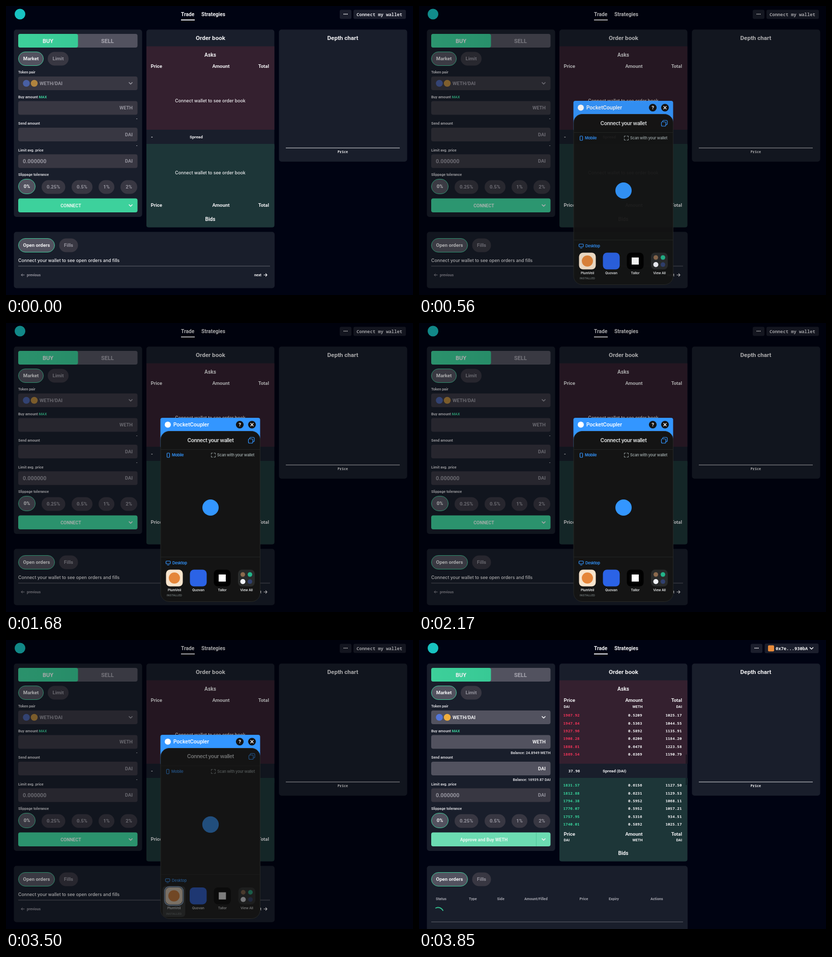
Write an HTML page that moves like this. It is 800 px wide and 570 px high and loops after 3920 ms.

```html
<!DOCTYPE html>
<html lang="en">
<head>
<meta charset="utf-8">
<title>Trade</title>
<style>
html, body { margin: 0; width: 100%; height: 100%; overflow: hidden; background: #000312; }
svg { display: block; width: 800px; height: 570px; }
text { font-family: Roboto, sans-serif; font-weight: 700; white-space: pre; }
.inter { font-family: Inter, sans-serif; font-weight: 500; }
.semi { font-family: Inter, sans-serif; font-weight: 600; }
.mono { font-family: "Noto Sans Mono", monospace; font-weight: 600; }
</style>
</head>
<body>
<svg id="stage" viewBox="0 0 800 570"></svg>
<script>
const LOOP = 3920, STEP = 70;
const WHITE = '#f1f1f3', GREY = '#96959f', GREEN = '#3dd19c', BLUE = '#3396ff';
const PANEL = '#191e2b', DIM = '#383742', LIT = '#52525f';

// Shape helpers; text y is the middle of the capitals.
const rect = (x, y, w, h, fill, r = 0, extra = '') =>
  `<rect x="${x}" y="${y}" width="${w}" height="${h}" rx="${r}" fill="${fill}" ${extra}/>`;
const dot = (x, y, r, fill) => `<circle cx="${x}" cy="${y}" r="${r}" fill="${fill}"/>`;
const path = (d, stroke, width = 1) =>
  `<path d="${d}" fill="none" stroke="${stroke}" stroke-width="${width}" stroke-linecap="round" stroke-linejoin="round"/>`;
const group = (id, body) => `<g id="${id}">${body}</g>`;
const text = (x, y, str, size, fill = WHITE, anchor = 'start', cls = '', gap = 0) =>
  `<text x="${x}" y="${y + size * .35}" font-size="${size}" fill="${fill}" text-anchor="${anchor}" class="${cls}" letter-spacing="${gap}">${str}</text>`;
const mid = (x, y, str, size, fill, cls, gap) => text(x, y, str, size, fill, 'middle', cls, gap);
const end = (x, y, str, size, fill, cls) => text(x, y, str, size, fill, 'end', cls);
const chevron = (x, y, color) => path(`M${x - 3} ${y - 1.5}l3 3 3-3`, color, 1.7);

function pill(x, y, w, h, label, active) {
  return rect(x, y, w, h, active ? LIT : DIM, h / 2, active ? 'stroke="#42c99a"' : '') +
    mid(x + w / 2, y + h / 2, label, 9.6, active ? WHITE : GREY);
}

function field(y, bright, label, token, value = '') {
  const color = bright ? WHITE : GREY;
  return text(24, y - 22, label, 7.2, '#d3d3d8') +
    rect(24, y - 13.5, 234.5, 27, bright ? bright > 1 ? LIT : '#464651' : DIM, 4) +
    text(33, y, value, 10.8, GREY) + end(249, y, token, 9.4, color);
}

function header(state) {
  const x = state ? 652 : 656;
  return dot(27.5, 16, 10.5, '#18c3c2') +
    text(344, 16, 'Trade', 10.2) + text(384, 16, 'Strategies', 10.2) + rect(344, 26.5, 27, 2, WHITE) +
    rect(x, 7.5, 23, 18, '#1b1e2c', 3) + [-3, 0, 3].map(d => dot(x + 11.5 + d, 16, 1.1, WHITE)).join('') +
    (state
      ? rect(679.5, 7, 106, 19, '#1b1e2c', 3) + rect(686, 10.5, 12, 12, '#e88a3a', 2) +
        text(701, 16.5, '0x7e...930bA', 8.8, WHITE, 'start', 'mono') + chevron(771.5, 16.5, WHITE)
      : rect(683, 7.5, 103, 18, '#1b1e2c', 3) + text(689, 16.5, 'Connect my wallet', 8.8, '#dcdce2', 'start', 'mono'));
}

function orderForm(state) {
  const loaded = state === 2, color = state ? WHITE : GREY;
  const balances = [['-', '-'], ['Balance: 0.00 WETH', 'Balance: 0.00 DAI'], ['Balance: 24.8949 WETH', 'Balance: 16939.87 DAI']][state];
  return rect(15.5, 46.5, 252, 369.5, PANEL, 5) +
    rect(24, 55, 234.5, 27, LIT, 4) + rect(24, 55, 117.5, 27, 'url(#buy)', 4) +
    mid(82.5, 69, 'BUY', 11) + mid(199.5, 69, 'SELL', 11, '#a9a8b2') +
    pill(24.5, 90.5, 49, 27, 'Market', true) + pill(82, 90.5, 41, 27, 'Limit') +
    field(152.5, state, 'Token pair', '') +
    `<g opacity="${loaded ? 1 : .65}">${dot(40, 152.5, 6.8, '#5275d8')}${dot(55.5, 152.5, 6.8, '#f0ae3c')}</g>` +
    text(66, 152.5, 'WETH/DAI', 9.5, color) + chevron(245, 152.5, color) +
    field(201, state, `Buy amount <tspan fill="${GREEN}">MAX</tspan>`, 'WETH') +
    field(253.5, state, 'Send amount', 'DAI') +
    balances.map((b, i) => end(258.5, 222.5 + i * 52.5, b, 7.2, '#d3d3d8')).join('') +
    field(306, 0, 'Limit avg. price', 'DAI', '0.000000') +
    text(24, 332, 'Slippage tolerance', 7.2, '#d3d3d8') +
    pill(24.5, 341.5, 33, 29, '0%', true) + pill(70, 343.5, 46.5, 27, '0.25%') + pill(129, 343.5, 41, 27, '0.5%') +
    pill(182, 343.5, 31, 27, '1%') + pill(225, 343.5, 33, 27, '2%') +
    rect(24, 379.5, 234.5, 27.5, loaded ? '#6cdcb2' : GREEN, 4) +
    (loaded ? rect(230, 380, 1, 27, '#4fc79b') : '') +
    mid(127.5, 393.5, state ? 'Approve and Buy WETH' : 'CONNECT', 8.8, '#e9f8f1') + chevron(245, 393.5, WHITE);
}

const asks = [[1967.92, .5209, 1025.17], [1947.84, .5363, 1044.55], [1927.96, .5892, 1135.91],
  [1908.28, .6206, 1184.2], [1888.81, .6478, 1223.58], [1869.54, .6369, 1190.79]];
const bids = [[1831.57, .6156, 1127.5], [1812.88, .6231, 1129.53], [1794.38, .5952, 1068.11],
  [1776.07, .5952, 1057.21], [1757.95, .5316, 934.51], [1740.01, .5892, 1025.17]];

const columns = (y, names, size) =>
  text(284.5, y, names[0], size) + end(439.5, y, names[1], size) + end(517, y, names[2], size);
const rows = (list, top, color) => list.map(([price, amount, total], i) => {
  const y = top + i * 15.4;
  return text(283.5, y, price.toFixed(2), 7.65, color, 'start', 'mono') +
    end(438.5, y, amount.toFixed(4), 7.65, WHITE, 'mono') + end(516.5, y, total.toFixed(2), 7.65, WHITE, 'mono');
}).join('');

function orderBook(state) {
  const loaded = state === 2, names = ['Price', 'Amount', 'Total'], units = ['DAI', 'WETH', 'DAI'];
  const note = state ? 'An error occurred while retrieving the data' : 'Connect wallet to see order book';
  return rect(276, 46.5, 251.5, 390, PANEL, 5) + rect(276, 79.5, 251.5, 164.5, '#34202f') +
    rect(276, 272, 251.5, 164.5, '#1d3638', 4) + rect(276, 272, 251.5, 10, '#1d3638') +
    mid(402, 62.5, 'Order book', 11.6) + mid(401.5, 96, 'Asks', 10.2) + mid(401.5, 420.5, 'Bids', 10.2) +
    columns(119, names, 9.6) + columns(loaded ? 382.5 : 393, names, 9.6) +
    text(361, 258, loaded ? 'Spread (DAI)' : 'Spread', 8.1) +
    (loaded
      ? columns(131, units, 7.2) + columns(394.5, units, 7.2) + rows(asks, 148.5, '#ee3358') + rows(bids, 286.5, '#38d39b') +
        text(293.5, 258, '37.96', 7.65, WHITE, 'start', 'mono') +
        rect(524.5, 226, 2, 18, '#17141f') + rect(524.5, 272, 2, 14, '#111c22')
      : mid(401.5, 186.5, note, 8.75, WHITE, 'inter') + mid(401.5, 329, note, 8.75, WHITE, 'inter') + text(285, 258, '-', 9.6));
}

function orders(state) {
  const heads = { Status: 33, Type: 98, Side: 153.5, 'Amount/Filled': 207, Price: 315.5, Expiry: 373, Actions: 455 };
  return rect(15.5, 445.5, 512.5, state ? 140 : 111, PANEL, 5) +
    pill(24.5, 458.5, 71, 27, 'Open orders', true) + pill(104.5, 458.5, 37, 27, 'Fills') +
    (state
      ? Object.entries(heads).map(([name, x]) => text(x, 510, name, 7.2, '#a3a4ad')).join('') + rect(24, 555.5, 495, 1, '#62656e')
      : text(24, 501.5, 'Connect your wallet to see open orders and fills', 8.75, WHITE, 'start', 'inter') +
        rect(24, 512.5, 495, 1, '#62656e') +
        path('M36 530.5h-6m2.5-2.5l-2.5 2.5 2.5 2.5', GREY) + text(41, 530.5, 'previous', 7, GREY) +
        text(488, 530.5, 'next', 7.2) + path('M507 530.5h6m-2.5-2.5l2.5 2.5-2.5 2.5', WHITE, 1.2));
}

const depthChart = rect(536.5, 46.5, 252, 260.5, PANEL, 5) + mid(662, 62.5, 'Depth chart', 11.6) +
  rect(550, 279.5, 224, 1, '#dcdce0') + mid(662, 287.5, 'Price', 6.8, WHITE, 'mono');
const page = state => group('page' + state, header(state) + orderForm(state) + orderBook(state) + depthChart + orders(state));

// Wallet dialog
const modalHead = rect(303.5, 187, 196, 60, BLUE, 4) + dot(318, 200.5, 6, '#fff') +
  text(329, 200.5, 'PocketCoupler', 10, '#fff', 'start', 'semi', -.1) +
  dot(459.5, 200.5, 7.6, '#141414') + mid(459.5, 200.5, '?', 9.5, '#fff') +
  dot(483.5, 200.5, 7.6, '#141414') + path('M481 198l5 5m0-5l-5 5', '#fff', 1.4);

const tile = (x, fill) => rect(x - 16.5, 486.5, 33, 33, fill, 8);
const walletName = (x, name) => mid(x, 527, name, 6.6, '#e4e7e7', 'semi', -.15);
const picker =
  mid(402, 231.5, 'Connect your wallet', 10.2, '#e4e7e7', 'semi', -.4) +
  rect(479, 225.5, 9, 8.5, 'none', 2, `stroke="${BLUE}" stroke-width="1.2"`) +
  rect(476.5, 228.5, 8.5, 8.5, '#141414', 2, `stroke="${BLUE}" stroke-width="1.2"`) +
  rect(304, 249, 195, 1, '#222423') + rect(304, 461, 195, 1, '#222423') +
  rect(316.5, 256.5, 5, 8.5, 'none', 1.3, `stroke="${BLUE}" stroke-width="1.2"`) +
  text(326, 260.5, 'Mobile', 7.5, BLUE, 'start', 'semi', -.2) +
  path('M403.5 259v-2.5h2.5m3 0h2.5v2.5m0 3v2.5h-2.5m-3 0h-2.5v-2.5', '#949e9e') +
  text(415, 260.5, 'Scan with your wallet', 7.5, '#949e9e', 'start', 'semi', -.2) +
  dot(402, 364, 16, BLUE) +
  rect(314.5, 469.5, 8.5, 5.5, 'none', 1.3, `stroke="${BLUE}" stroke-width="1.2"`) + path('M317 477.3h3.5', BLUE) +
  text(327, 473.5, 'Desktop', 7.5, BLUE, 'start', 'semi', -.2) +
  group('hover', rect(309, 484, 44, 60, '#303131', 6)) +
  tile(331, '#f8e4cc') + dot(331, 503, 11, '#e5863a') + tile(378, '#2b63e6') +
  tile(425, '#000') + rect(418, 496, 14, 14, '#fff') +
  tile(472.5, '#292b2b') + dot(465.5, 496, 4.5, '#8c6a4d') + dot(479.5, 496, 4.5, '#23b58a') +
  dot(465.5, 510, 5, '#f2f4fa') + dot(479.5, 510, 4.5, '#30406e') +
  walletName(331, 'PlumVeil') + walletName(378, 'Quovan') + walletName(425, 'Tallor') + walletName(472.5, 'View All') +
  mid(331, 537.5, 'INSTALLED', 5.4, '#6e7777', 'semi', .1) +
  group('ring', rect(313, 485, 36, 36, 'none', 9, 'stroke="#a9cdf5" stroke-width="1.5"'));

const waiting = mid(402, 268, 'PlumVeil', 10.2, '#e4e7e7', 'semi', -.3) +
  rect(377.5, 312, 48.5, 48.5, '#f8e4cc', 13) + dot(402, 336, 16, '#e5863a') +
  mid(402, 382, 'Continue in PlumVeil...', 8.2, '#e4e7e7', 'semi', -.1) + mid(402, 465, 'Retry', 7.5, BLUE, 'semi');

const stage = document.getElementById('stage');
stage.innerHTML = `<defs><linearGradient id="buy"><stop stop-color="#3dd09a"/><stop offset="1" stop-color="#38c995"/></linearGradient></defs>` +
  rect(0, 0, 800, 570, '#000312') + [0, 1, 2].map(page).join('') +
  `<circle id="spinner" cx="37.5" cy="538" r="10.5" fill="none" stroke="#35c592" stroke-width="1.8" stroke-dasharray="18 66"/>` +
  rect(0, 0, 800, 570, '#000', 0, 'id="shade"') +
  group('modal', group('head', modalHead) + rect(304, 213.5, 195.5, 336, '#141414', 17, 'id="body" stroke="#262826"') +
    group('picker', picker) + group('waiting', waiting));

const part = id => document.getElementById(id);
const show = (id, opacity) => {
  part(id).style.display = opacity > 0 ? '' : 'none';
  part(id).setAttribute('opacity', opacity);
};
const ramp = (t, from, to) => Math.min(1, Math.max(0, (t - from) / (to - from)));

function draw(t) {
  const state = t < 3640 ? 0 : t < 3780 ? 1 : 2;
  for (let i = 0; i < 3; i++) show('page' + i, +(i === state));

  show('spinner', +(state > 0));
  part('spinner').setAttribute('transform', `rotate(${170 + (t - 3710) * .5} 37.5 538)`);

  const opening = 1 - (1 - ramp(t, 380, 620)) ** 2;
  const visible = opening * (1 - ramp(t, 3640, 3815));
  show('shade', visible * .3);
  show('modal', visible);

  const shrink = 35 * ramp(t, 3500, 3570);
  part('head').setAttribute('transform', `translate(0 ${shrink})`);
  part('body').setAttribute('y', 213.5 + shrink);
  part('body').setAttribute('height', 336 - 2 * shrink);

  const leaving = ramp(t, 3430, 3557);
  const scale = 1 + .022 * leaving;
  show('picker', 1 - leaving);
  part('picker').setAttribute('transform', `translate(402 364) scale(${scale}) translate(-402 -364)`);
  show('hover', +(t >= 2520));
  show('ring', +(t > 3430));
  show('waiting', ramp(t, 3590, 3960));
}

function tick(now) {
  draw(Math.floor(now % LOOP / STEP) * STEP);
  requestAnimationFrame(tick);
}
draw(0);
requestAnimationFrame(tick);
</script>
</body>
</html>
```
